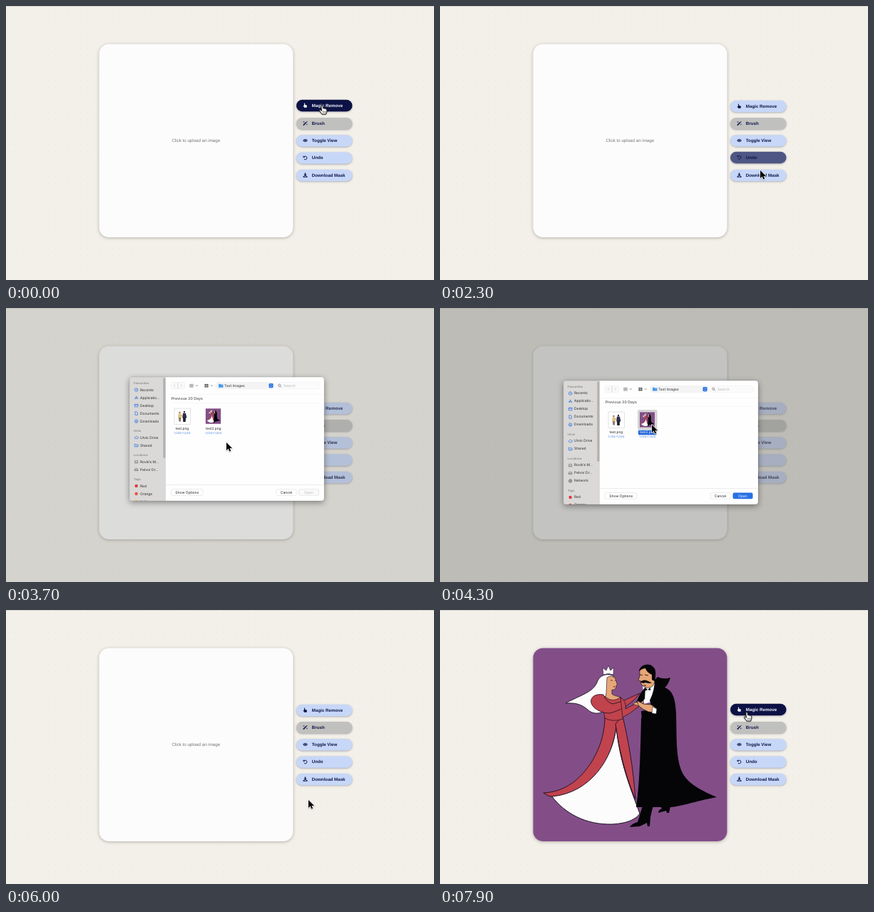
These frames come from a looping animation (600 px wide and 385 px high, 8000 ms). An HTML page with a canvas:

```html
<!DOCTYPE html>
<html lang="en">
<head>
<meta charset="utf-8">
<title>Magic Remove</title>
<style>
html, body { margin: 0; width: 100%; height: 100%; overflow: hidden; background: #f3f0e9; }
canvas { display: block; width: 600px; height: 385px; }
</style>
</head>
<body>
<canvas id="stage"></canvas>
<script>
const W = 600, H = 385, LOOP = 8000;
const canvas = document.getElementById('stage');
const ctx = canvas.getContext('2d');
const ratio = window.devicePixelRatio || 1;
canvas.width = W * ratio;
canvas.height = H * ratio;

const UI = 'Inter, sans-serif';
const WEB = '"Liberation Sans", Arial, sans-serif';
const NAVY = '#10164a', BLUE = '#2870e4';

const clamp = (v, a, b) => Math.min(b, Math.max(a, v));
const mix = (a, b, k) => a + (b - a) * k;
const smooth = k => k * k * (3 - 2 * k);

// Value at time t along keys of [time, ...values].
function track(keys, t, ease = k => k) {
  if (t <= keys[0][0]) return keys[0].slice(1);
  for (let i = 1; i < keys.length; i++) {
    const a = keys[i - 1], b = keys[i];
    if (t < b[0]) {
      const k = ease((t - a[0]) / (b[0] - a[0]));
      return a.slice(1).map((v, j) => mix(v, b[j + 1], k));
    }
  }
  return keys[keys.length - 1].slice(1);
}

const POINTER = [
  [0, 443, 139.5], [80, 443, 139.5], [300, 447, 231], [430, 447, 231],
  [850, 446, 134], [1000, 446, 136], [1250, 440, 186], [1500, 256, 184],
  [1850, 446, 208], [2050, 448, 213], [2135, 449, 222], [2220, 449, 229],
  [2300, 449, 231], [2400, 449, 237], [2720, 266, 187], [3000, 266, 187],
  [3350, 309, 189], [3800, 309, 189], [4150, 297, 164], [4750, 297, 164],
  [5250, 424, 267], [6300, 424, 267], [6700, 440, 235], [7100, 434, 158],
  [7300, 430, 143.5], [8000, 430, 143.5]
];
const DIM = [[3400, 0], [3700, 0.25], [3800, 0.45], [5500, 0.45], [5800, 0.34], [5950, 0]];
const SHEET_Y = [[3550, 88], [3700, 97], [3800, 102], [5500, 102], [5800, 100], [5950, 96]];
const SHEET_ALPHA = [[3500, 0], [3650, 1], [5550, 1], [5800, 0.76], [5950, 0]];
const OPENED = 3500, PICKED = 4150, CLOSED = 5500, LOADED = 6600;
const LAG = 80, FADE = 250;

const BUTTONS = [
  { label: 'Magic Remove', y: 141, icon: 'hand' },
  { label: 'Brush', y: 165.2, icon: 'wand', off: true },
  { label: 'Toggle View', y: 189.4, icon: 'eye' },
  { label: 'Undo', y: 213.6, icon: 'undo' },
  { label: 'Download Mask', y: 238, icon: 'save' }
];

const pointer = t => track(POINTER, t, smooth);
const blocked = t => t > OPENED && t < 5950;

function isOver(b, t) {
  if (b.off || blocked(t)) return false;
  const [x, y] = pointer(t - LAG);
  return x > 407 && x < 485.5 && Math.abs(y - b.y) < 8.2;
}

function hoverLevel(b, t) {
  let level = 0;
  for (let s = t - 700; s <= t; s += 10) {
    level = clamp(level + (isOver(b, s) ? 10 : -10) / FADE, 0, 1);
  }
  return level;
}

function box(x, y, w, h, r, fill, line, lw = 0.5) {
  ctx.beginPath();
  ctx.roundRect(x, y, w, h, r);
  if (fill) { ctx.fillStyle = fill; ctx.fill(); }
  if (line) { ctx.strokeStyle = line; ctx.lineWidth = lw; ctx.stroke(); }
}

function dot(x, y, r, fill) {
  ctx.beginPath();
  ctx.arc(x, y, r, 0, 7);
  ctx.fillStyle = fill;
  ctx.fill();
}

function shape(d, fill, line, lw = 1) {
  const p = new Path2D(d);
  if (fill) { ctx.fillStyle = fill; ctx.fill(p); }
  if (line) { ctx.strokeStyle = line; ctx.lineWidth = lw; ctx.stroke(p); }
}

function text(s, x, y, size, color, { family = UI, weight = 400, align = 'left' } = {}) {
  ctx.font = `${weight} ${size}px ${family}`;
  ctx.textAlign = align;
  ctx.textBaseline = 'middle';
  ctx.fillStyle = color;
  ctx.fillText(s, x, y);
}

function shadow(color, blur, dy) {
  ctx.shadowColor = color;
  ctx.shadowBlur = blur * ratio;
  ctx.shadowOffsetY = dy * ratio;
}

function at(x, y, k, draw) {
  ctx.save();
  ctx.translate(x, y);
  ctx.scale(k, k);
  draw();
  ctx.restore();
}

// Icons sit in a 6 px square around the origin.
const ICONS = {
  hand: c => shape('M-1.6-3Q-.9-3.6-.4-2.9V-.9L2-.3Q2.7 0 2.5.8L2 3.2H-1.2L-2.9.8Q-2.6-.3-1.6.3Z', c),
  wand(c) {
    shape('M-2.8 2.8L1.6-1.6', null, c, 1.5);
    shape('M2-2.6L2.8-1.9', null, c, 1.2);
    shape('M-2-2.9V-1.1M-2.9-2H-1.1M2.3.8V2.4M1.5 1.6H3.1', null, c, 0.6);
  },
  eye(c) {
    shape('M-3.4 0Q0-4.6 3.4 0Q0 4.6-3.4 0Z', c);
    shape('M-1.5 0A1.5 1.5 0 1 0 1.5 0A1.5 1.5 0 1 0-1.5 0', null, '#c7d7f8', 0.6);
  },
  undo(c) {
    shape('M-1.9-1.3A2.4 2.4 0 1 1-1.7 1.8', null, c, 1);
    shape('M-3-3V-.3H-.3Z', c);
  },
  save(c) {
    shape('M-.8-3.2H.8V-.8H2.4L0 1.6L-2.4-.8H-.8Z', c);
    shape('M-3 1.2H-1.5L0 2.5L1.5 1.2H3V3.2H-3Z', c);
  }
};

const SIDE_ICONS = {
  clock: 'M-2.3 0A2.3 2.3 0 1 0 2.3 0A2.3 2.3 0 1 0-2.3 0M0-1.3V.1L1 .7',
  apps: 'M-1.9 2L.5-2.2M1.9 2L-.5-2.2M-2.5.8H2.5',
  desk: 'M-2.4-1.8H2.4V1.8H-2.4ZM-2.4-.9H2.4',
  doc: 'M-1.7-2.3H.6L1.7-1.1V2.3H-1.7Z',
  down: 'M-2.3 0A2.3 2.3 0 1 0 2.3 0A2.3 2.3 0 1 0-2.3 0M0-1.2V1.2M-.9.3L0 1.2L.9.3',
  cloud: 'M-1.6 1.5A1.3 1.3 0 0 1-1.5-.9A1.7 1.7 0 0 1 1.5-.9A1.2 1.2 0 0 1 1.7 1.5Z',
  share: 'M-2.4-1.7H-.6L0-1.1H2.4V1.8H-2.4ZM-.9 1.2Q0-.2.9 1.2',
  laptop: 'M-1.9-1.6H1.9V1H-1.9ZM-2.8 1.7H2.8',
  disk: 'M-1.6-1.5H1.6L2.4.4V1.6H-2.4V.4ZM-2.4.4H2.4',
  globe: 'M-2.3 0A2.3 2.3 0 1 0 2.3 0A2.3 2.3 0 1 0-2.3 0M-2.3 0H2.3M0-2.3Q-2 0 0 2.3Q2 0 0-2.3'
};

function drawWoman() {
  const red = '#c1434d', ink = '#1a1020', skin = '#e5a678';
  shape('M243 92C231 88 223 93 220 102C214 116 196 120 176 131C191 130 199 133 207 140C214 147 226 147 233 139L238 116Z', '#fdfcfd', ink, 0.9);
  shape('M234 95C239 91 246 93 247 100L248.5 105L247 106C247 111 244 113 241 112L241 118C244 121 250 121 254 123L249 133L231 126L233 117Z', skin, ink, 0.6);
  shape('M229 91L228 81L233 85L236 78L239 85L243.5 81L243 91Q236 88 229 91Z', '#fdfcfd', ink, 0.6);
  shape('M239 99Q241 98 242 99.5M245 99L246.5 99', null, ink, 0.7);
  shape('M242.5 107.5L246 106.8L244 109Z', '#b02938');
  // train and skirt
  shape('M231 150C231 180 219 210 198 232C184 247 166 256 145 257Q151 262 160 263C205 262 238 222 247 166L256 150Z', red, ink, 0.9);
  shape('M247 164C243 207 212 257 157 262C175 286 205 302 241 301C262 300 275 294 280 286C267 250 252 215 247 164Z', '#fdfcfd', ink, 1);
  shape('M246 160L256 149C264 183 271 222 274 266C263 241 252 204 246 160Z', red, ink, 0.9);
  // bodice and arms
  shape('M231 121C236 127 246 129 253 122L260 133C261 141 258 146 256 153Q243 158 231 152L228 133Z', red, ink, 0.7);
  shape('M229 119C217 117 210 123 212 131C215 139 226 145 238 145C254 141 270 131 280 117C268 122 256 129 242 132Q234 130 229 119Z', red, ink, 0.8);
  shape('M253 123Q262 128 260 139L283 127L278 136Q266 146 256 151Z', red, ink, 0.7);
  shape('M270 132L282 126L286 129L279 135Z', skin, ink, 0.5);
}

function drawMan() {
  const ink = '#050407', skin = '#e5a678';
  shape('M285 272L299 274L295 291L294 304L291 304L290 299L280 304L266 305Q269 300 277 298Z', ink);
  shape('M307 272H324L321 285L318 285L317 282L306 285Q306 281 311 279Z', ink);
  shape('M284 104L302 101L304 127L286 132Z', '#fdfcfd');
  shape('M280 83C284 78 295 78 300 87L301 101C299 110 291 111 285 107L282 104L282 100L278 99L280 93Z', skin, ink, 0.6);
  shape('M279 86C280 77 293 73 299 80C304 84 302 94 301 100L297 98L297 91Q290 88 288 82Q284 82 279 86Z', ink);
  shape('M281 101Q286 95 297 103Q291 103 288 102Q284 104 281 101Z', ink);
  shape('M280 91L284 91.5M287 91L292 92M285 106H289', null, ink, 0.8);
  shape('M301 98L305 94Q314 98 323 95Q320 105 315 109C327 113 330 126 331 145C332 180 330 211 341 231C351 247 370 255 388 263C355 269 330 279 316 277L275 277C280 244 281 196 282 152L299 145L294 127Q301 113 301 98Z', ink);
  shape('M288 108L281 117L275 130L282 130L287 125Z', ink);
  shape('M282 142L302 139L305 151L283 156Z', ink);
  shape('M276 127L285 132L296 133L303 138L300 144L292 143L284 139L278 134Z', skin, ink, 0.6);
  shape('M298 136L304 139L303 146L297 145Z', '#fdfcfd', ink, 0.5);
  shape('M288 109L291 112L295 109L295 113L291 112L287 114Z', ink);
}

function drawPicture() {
  ctx.fillStyle = '#834e88';
  ctx.fillRect(130, 53, 273, 273);
  drawWoman();
  drawMan();
}

function drawButton(b, t) {
  const k = smooth(hoverLevel(b, t));
  const y = b.y - k;
  const c = [[199, 13], [215, 18], [248, 69]].map(([p, q]) => Math.round(mix(p, q, k)));
  ctx.save();
  shadow('rgba(40,40,60,0.35)', 2.5, 0.9);
  box(407, y - 8.2, 78.5, 16.4, 8.2, b.off ? '#c0c0be' : `rgb(${c})`);
  ctx.restore();
  const ink = isOver(b, t) ? '#f4f6ff' : NAVY;
  at(419.5, y - 0.3, 0.98, () => ICONS[b.icon](ink));
  text(b.label, 428.8, y, 6.2, ink, { family: WEB, weight: 700 });
}

function drawPage(t) {
  ctx.fillStyle = '#f3f0e9';
  ctx.fillRect(0, 0, W, H);
  ctx.fillStyle = 'rgba(90,80,60,0.1)';
  for (let y = 4.5; y < H; y += 9.07) {
    for (let x = 4.5; x < W; x += 9.07) ctx.fillRect(x, y, 0.8, 0.8);
  }
  ctx.fillStyle = '#d8d5cf';
  ctx.fillRect(0, 0, W, 1);

  ctx.save();
  shadow('rgba(60,55,45,0.35)', 4, 1);
  box(130.5, 53.5, 272, 271.5, 14, '#fcfcfc');
  ctx.restore();
  if (t >= LOADED) {
    ctx.save();
    ctx.beginPath();
    ctx.roundRect(130.5, 53.5, 272, 271.5, 14);
    ctx.clip();
    drawPicture();
    ctx.restore();
  } else {
    text('Click to upload an image', 266.3, 189.3, 6.2, '#757575', { family: WEB, align: 'center' });
  }
  BUTTONS.forEach(b => drawButton(b, t));
}

function drawSidebar(t) {
  const active = t < CLOSED, shift = t > 3900 ? 11 : 0;
  const ink = active ? '#2b2b2b' : '#8c8c8c';
  const head = (s, y) => text(s, 179, y, 4.2, '#8b8a88', { weight: 600 });
  const item = (icon, s, y, color = BLUE) => {
    at(182.7, y, 1, () => shape(SIDE_ICONS[icon], null, color, 0.7));
    text(s, 188, y, 4.95, ink);
  };
  ctx.globalAlpha *= active ? 1 : 0.8;
  const blue = active ? BLUE : '#8fb2ea';
  head('Favourites', 9);
  item('clock', 'Recents', 18, blue);
  item('apps', 'Applicatio...', 29, blue);
  item('desk', 'Desktop', 40, blue);
  item('doc', 'Documents', 51, blue);
  item('down', 'Downloads', 62, blue);
  head('Ulvio', 76);
  item('cloud', 'Ulvio Drive', 85, blue);
  item('share', 'Shared', 96, blue);
  head('Locations', 110);
  item('laptop', 'Rovik\u2019s M...', 119, '#737373');
  item('disk', 'Pelvor Dr...', 130, '#737373');
  if (shift) item('globe', 'Network', 141, '#737373');
  head('Tags', 144 + shift);
  [['Red', '#e0383e'], ['Orange', '#f0503a'], ['Yellow', '#f0c030']].forEach(([s, c], i) => {
    const y = 153 + shift + i * 11;
    dot(182.7, y, 2.2, active ? c : '#e89a8c');
    text(s, 188, y, 4.95, ink);
  });
}

function drawToolbar(active) {
  box(231.5, 7.5, 19, 9, 2, '#fafafa', '#e6e6e6');
  shape('M237 10L235.2 12L237 14M245 10L246.8 12L245 14M241 8V16', null, '#c4c4c4', 0.6);
  [260, 281].forEach((x, i) => {
    for (const dx of [-2.4, 0.4]) {
      for (const dy of [-2, 0.6]) box(x + dx, 12 + dy, 2, 1.6, 0.3, i ? '#555' : null, '#555', 0.5);
    }
    shape(`M${x + 6} 11.3L${x + 7.3} 12.7L${x + 8.6} 11.3`, null, '#555', 0.7);
  });
  box(295, 7.5, 81, 9, 2, '#f4f4f4', '#ebebeb');
  shape('M298 9.8H300.5L301.2 10.5H304.5V14.6H298Z', active ? '#4a9bea' : '#7fb4e8');
  text('Test Images', 306, 12.2, 5, '#333');
  if (active) box(368.5, 9, 6, 6.2, 1.4, BLUE);
  shape('M370.3 11.4L371.5 10.2L372.7 11.4M370.3 12.8L371.5 14L372.7 12.8', null, active ? '#fff' : '#444', 0.6);
  box(379, 7.5, 60, 9, 2, '#fbfbfb', '#ececec');
  shape('M381.6 11.6A1.6 1.6 0 1 0 384.8 11.6A1.6 1.6 0 1 0 381.6 11.6M384.4 12.9L386 14.5', null, '#555', 0.6);
  text('Search', 389, 12.2, 5, '#b4b4b4');
}

function drawFiles(t) {
  const picked = t >= PICKED, active = t < CLOSED;
  box(236, 44, 22.5, 22.5, 0.5, '#fff', '#cfcfcf', 0.6);
  // small couple
  dot(243.5, 50, 1.2, '#9b6a4a');
  dot(250, 49, 1.2, '#3a2a24');
  shape('M241.7 51.5H245.3L246 57H241.2Z', '#e4c27a');
  shape('M242 57H245.5L245 62.5H242.4Z', '#8a7a68');
  shape('M248 50.6H252L253.5 57.5H247.2Z', '#2c3048');
  shape('M248 57H252L251.8 63H248.3Z', '#20222c');
  shape('M245.4 53L247.5 55.5', null, '#9b6a4a', 0.8);

  if (picked) box(277, 41, 27.5, 28, 2, '#d3d3d3');
  ctx.save();
  ctx.beginPath();
  ctx.rect(279.5, 44, 22, 22);
  ctx.clip();
  const k = 22 / 272;
  at(279.5 - 130.5 * k, 44 - 53.5 * k, k, drawPicture);
  ctx.restore();
  box(279.5, 44, 22, 22, 0, null, '#eee', 0.6);

  const mid = { align: 'center' };
  if (picked) box(278, 69.8, 25.5, 6.4, 1.3, active ? '#1f63d8' : '#d0d0d0');
  text('test.png', 247, 73, 4.8, '#222', mid);
  text('test2.png', 290.7, 73, 4.8, picked && active ? '#fff' : '#222', mid);
  text('1,024\u00d71,024', 247, 78.9, 4, '#4a86e0', mid);
  text('1,024\u00d71,024', 290.7, 78.9, 4, '#4a86e0', mid);
}

function pushButton(s, x, w, fill, ink) {
  box(x, 157.6, w, 8.6, 2, fill, fill === BLUE ? null : '#d4d4d4');
  text(s, x + w / 2, 162, 5, ink, { align: 'center' });
}

function drawSheet(t) {
  const alpha = track(SHEET_ALPHA, t)[0];
  if (t < OPENED || alpha <= 0) return;
  const active = t < CLOSED, picked = t >= PICKED;
  ctx.save();
  ctx.translate(0, track(SHEET_Y, t)[0]);
  ctx.globalAlpha = alpha;
  ctx.save();
  shadow('rgba(0,0,0,0.4)', 9, 2.5);
  box(173, 0, 273, 174, 4, '#fefefe');
  ctx.restore();
  ctx.beginPath();
  ctx.roundRect(173, 0, 273, 174, 4);
  ctx.clip();
  ctx.fillStyle = active ? '#dad9d7' : '#e2e2e1';
  ctx.fillRect(173, 0, 51, 174);
  ctx.save();
  drawSidebar(t);
  ctx.restore();
  if (t < 5300) box(220.3, 1, 3.2, 113, 1.6, '#b3b2b0');

  drawToolbar(active);
  ctx.fillStyle = '#eeeeee';
  ctx.fillRect(224, 24, 222, 0.5);
  ctx.fillRect(231, 36.5, 208, 0.5);
  ctx.fillStyle = '#e2e2e2';
  ctx.fillRect(224, 151, 222, 0.6);
  text('Previous 30 Days', 231.7, 30.8, 5.3, '#555', { weight: 500 });
  drawFiles(t);

  pushButton('Show Options', 231.5, 44.5, '#fff', '#222');
  pushButton('Cancel', 379, 28, '#fff', '#222');
  if (!picked) pushButton('Open', 410.5, 28, '#fafafa', '#bbb');
  else pushButton('Open', 410.5, 28, active ? BLUE : '#fff', active ? '#fff' : '#222');
  ctx.restore();
  box(173, track(SHEET_Y, t)[0], 273, 174, 4, null, `rgba(0,0,0,${0.18 * alpha})`, 0.5);
}

function drawPointer(t) {
  const [x, y] = pointer(t);
  const [px, py] = pointer(t - LAG);
  const onCard = t < LOADED && px > 130 && px < 402 && py > 53 && py < 325;
  const hand = !blocked(t) && (onCard || BUTTONS.some(b => isOver(b, t)));
  ctx.save();
  ctx.lineJoin = 'round';
  shadow('rgba(0,0,0,0.35)', 1.5, 0.6);
  at(x, y, 1, () => {
    if (hand) {
      shape('M-1.3.9Q0-.8 1.2.9L1.6 4.3Q2.6 3.5 3.5 4.7Q4.7 4 5.3 5.2Q6.9 4.8 7 6.6L6.6 9.7L5.5 12.5H0L-3.2 8.3Q-4.3 6.2-2.5 6.3L-.6 7.8Z', '#fff', '#111', 0.9);
      ctx.shadowColor = 'transparent';
      shape('M1.3 8V10.8M3 8V10.8M4.7 8V10.8', null, '#222', 0.6);
    } else {
      const arrow = 'M0 0V11L2.6 8.6L4.3 12.6L6.2 11.8L4.5 7.9H8Z';
      shape(arrow, null, '#fff', 1.4);
      ctx.shadowColor = 'transparent';
      shape(arrow, '#000');
    }
  });
  ctx.restore();
}

function frame(now) {
  const t = now % LOOP;
  ctx.setTransform(ratio, 0, 0, ratio, 0, 0);
  ctx.textRendering = 'geometricPrecision';
  drawPage(t);
  const dim = track(DIM, t)[0];
  if (dim > 0) {
    ctx.fillStyle = `rgba(125,125,120,${dim})`;
    ctx.fillRect(0, 0, W, H);
  }
  drawSheet(t);
  drawPointer(t);
  requestAnimationFrame(frame);
}
requestAnimationFrame(frame);
</script>
</body>
</html>
```
